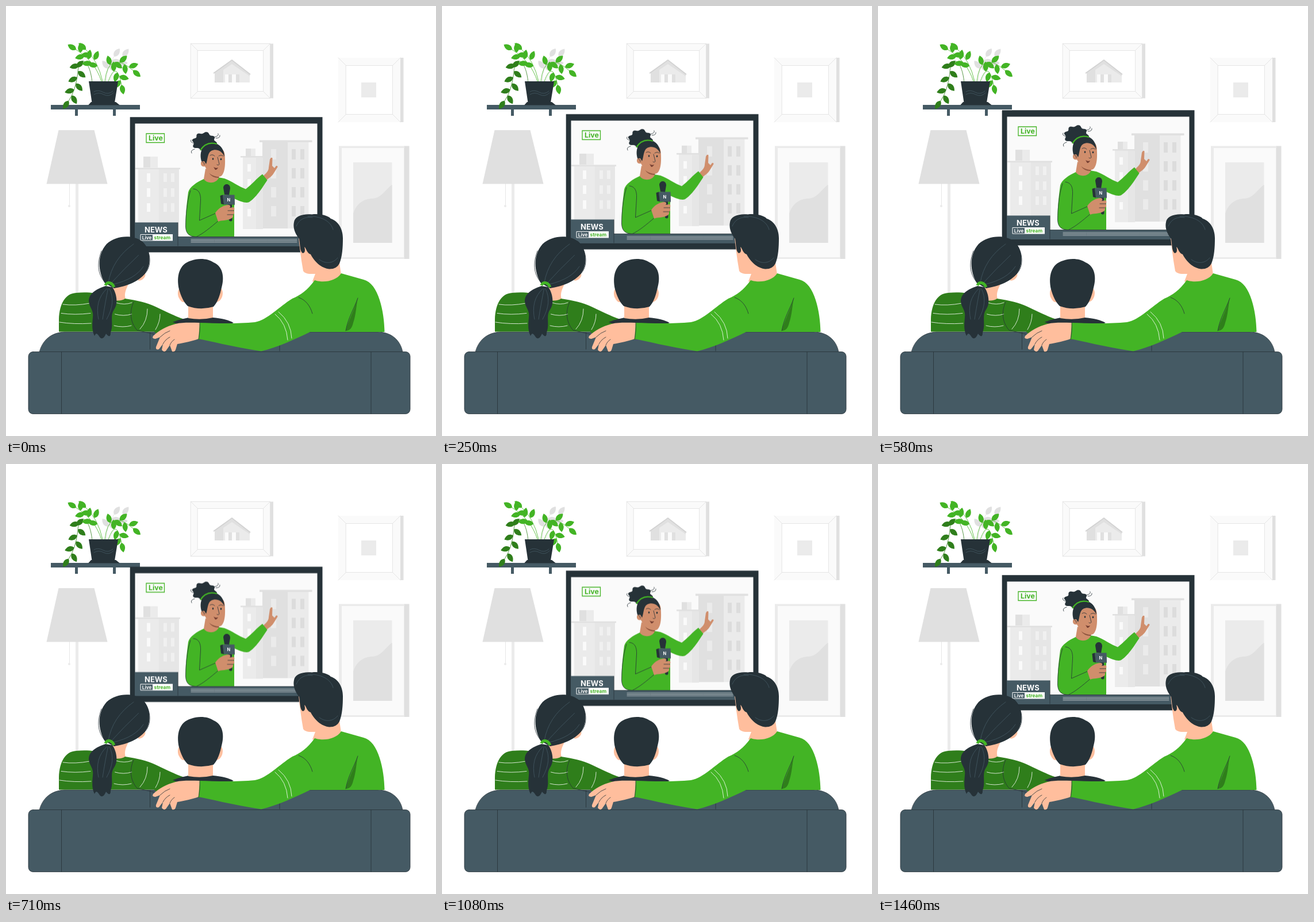
Write an HTML page that moves like this. It is 748 by 748 pixels and loops after 1.5 s.

```html
<!DOCTYPE html>
<html lang="en">
<head>
<meta charset="utf-8">
<title>Family watching the news</title>
<style>
html, body { margin: 0; width: 100%; height: 100%; overflow: hidden; background: #fff; }
svg { display: block; width: 100%; height: 100%; }
text { font-family: Inter, "Open Sans", sans-serif; font-weight: 700; }
.navy { fill: #263238; }
.slate { fill: #455a64; }
.green { fill: #43b425; }
.moss { fill: #2f7e1b; }
.skin { fill: #ffbe9d; }
.tan { fill: #d08e6c; }
.g1 { fill: #fafafa; }
.g2 { fill: #ebebeb; }
.g3 { fill: #e0e0e0; }
.line { fill: none; stroke: #263238; stroke-width: .8; stroke-linecap: round; stroke-linejoin: round; }
.pale { stroke: #e0e0e0; }
.soft { stroke: #455a64; }
.white { stroke: #fff; }
.band { fill: none; stroke: #43b425; }
</style>
</head>
<body>
<svg viewBox="0 0 748 748">
  <!-- pictures on the wall -->
  <g id="pictures"></g>
  <path class="g2" d="M363 116 393 95 424 118V133H363Z"/>
  <path class="g3" d="M363 116 378 105V133H363ZM393 95 424 118V122L393 101 378 111V105Z"/>
  <path class="g1" d="M381 119H405V133H381Z"/>
  <path class="g3" d="M387 119H393V133H387ZM400 119H406V133H400Z"/>
  <path fill="none" stroke="#d2d2d2" stroke-width="1.6" d="M361 117 393 94 425 119"/>
  <path class="g2" d="M618 133H644V159H618ZM579 243.5H694V440H579Z"/>
  <path class="g3" d="M693 243.5H701.5V440H693Z"/>
  <path class="g1" d="M584 247H692V437H584Z"/>
  <path class="g2" d="M604 272H671.5V412H604Z"/>
  <path class="g3" d="M604 361C610 343 622 336 636 335C653 335 660 319 671.5 311V412H604Z"/>

  <!-- lamp -->
  <path class="g2" d="M121 309H126V510H121Z"/>
  <path class="line pale" d="M110.500 309V347"/>
  <circle class="g2" cx="110" cy="348" r="2"/>
  <path class="g3" d="M91.500 216H153.500L176.500 309.500H70.500Z"/>

  <!-- shelf and plant -->
  <path class="slate" d="M78 172H233V180H78ZM120 180H125V191H120ZM186 180H191V191H186Z"/>
  <g id="plant"></g>
  <path class="navy" d="M144 131H195L189 168H149.500ZM148 167H191L198 172.500H143Z"/>
  <path class="line soft" d="M153 149Q160 145 169 150T186 148M153 154Q161 149 170 154T187 151"/>

  <!-- television -->
  <g id="tv">
    <path class="navy" d="M215.700 193.300H550.500V428.500H215.700Z"/>
    <path class="g1" d="M224.500 204.500H541.500V418H224.500Z"/>
    <g id="city">
      <path class="g2" d="M230 283H301V402H230ZM251 262H264V281H251ZM412 262H447V388H412ZM426 248H434V261H426ZM489 237H526.500V387H489Z"/>
      <path class="g3" d="M239 262H251V281H239ZM225 281.500H303V284H225ZM417 248H426V261H417ZM408 261H447V263.500H408ZM446 236H490V387H446ZM441 233.500H532.500V237H441Z"/>
      <path fill="#e6e6e6" d="M266 284H301V402H266ZM435 264H447V388H435Z"/>
    </g>
    <path class="band" stroke-width="1.3" d="M244 222H275.500V237.500H244Z"/>
    <text class="green" x="248" y="234.200" font-size="12.300">Live</text>

    <!-- reporter -->
    <path class="tan" d="M444 299C451 292 457 288 457 281L459 267Q461 262 463.500 264.500L463 278 467 282 470 278Q473 278 472.500 280L465 292C462 297 457 299 451 305Z"/>
    <path class="green" d="M346 300C332 306 319 315 317 324C314 346 312 369 312.500 384C313 397 320 401.500 331 401.500H397V335C407 340 416 343 422 341.500C434 335 446 316 454.500 303L446 292.500C437 299 427 311 417 318.500C405 314 393 305 380 300C371 298 357 297 346 300Z"/>
    <path class="line" d="M326 318C336 319 339 327 338.500 339L336.500 373 366 360M321 321C314 343 313 365 312.500 384C313 397 320 401 331 401.500C343 396 356 385 369 374M397 335V346"/>
    <path class="tan" d="M347 283 344 301C350 310 366 309 370 299V290Z"/>
    <path fill="#8f553f" d="M353 290Q360 297 371 296L370 299Q358 299 353 290Z"/>
    <path class="tan" d="M348 256C358 242 379 243 380.500 258C382 275 381 291 374 296C367 299 354 294 350 286L346 279C339 281 337 273 341 269Q345 266 348 273Z"/>
    <path class="navy" d="M340 270C336 255 341 244 352 240C365 235 379 243 380 262C375 250 364 248 357 252C350 256 351 268 348 275L345 270Z"/>
    <g id="bun"></g>
    <path class="band" stroke-width="2.300" d="M338 251C345 240 354 236 367 240"/>
    <path class="line" d="M328 239Q319 237 322 233M328 249Q320 251 323 256M363 228Q371 226 369 222M365 230Q373 230 372 225"/>
    <path class="line" d="M355 260Q359 257 363 261M370 261Q374 258 378 261M368 263 371 275Q370 278 367 276M341 271Q345 271 345 276"/>
    <ellipse class="navy" cx="360" cy="266" rx="1.300" ry="1.800"/>
    <ellipse class="navy" cx="374" cy="266.500" rx="1.300" ry="1.800"/>
    <path fill="#743e31" d="M361 280Q365 283 369 281Q367 285 364 285Z"/>
    <path class="navy" d="M386 344H393L393.500 373Q391 376 388 373ZM380 328 378 316C379 308 390 308 390 317L388 329Z"/>
    <path class="slate" d="M377 328.500H397.500L398 345.500H379Z"/>
    <path class="navy" d="M372.500 330 377 328.500 379 345.500 374 344Z"/>
    <text x="384.500" y="340" font-size="7.500" fill="#fff">N</text>
    <path class="tan" d="M364 360C370 351 379 346 388 346Q392 348 389 351L396 350Q399 353 396 356Q399 360 395 363Q396 368 391 370C383 374 376 372 369 375Z"/>
    <path class="line" stroke="#743e31" d="M396 356H386M395 363H385"/>

    <path class="slate" d="M224 401.500H541.500V418H224ZM224 376.500H299V418H224Z"/>
    <path class="line" d="M299 377V417M299 401.500H541"/>
    <g id="ticker" class="line white" opacity=".75"></g>
    <text x="241" y="394" font-size="13" fill="#fff">NEWS</text>
    <path fill="none" stroke="#fff" d="M234 397.500H255.500V408H234Z"/>
    <path fill="#fff" d="M255.500 397H290V408.500H255.500Z"/>
    <text x="236.800" y="405.500" font-size="8.200" fill="#fff">Live</text>
    <text class="green" x="257.500" y="405.500" font-size="8.400">stream</text>
  </g>

  <!-- sofa back -->
  <path class="slate" d="M58 603C63 582 78 568 102 567H646C669 567 686 580 690 603Z"/>
  <path class="line" d="M58 602C63 582 78 568 102 567H646C669 567 686 580 690 602M250.500 568V597M476 575V600"/>

  <!-- mother -->
  <path class="skin" d="M190 482 213 484C207 496 205 503 209 512C201 519 185 514 180 506ZM232 462C240 458 244 464 242 470Q239 477 230 478Z"/>
  <path class="moss" d="M92 566.500V545C93 518 103 500 122 499C140 497 157 499 170 503C184 515 201 514 207 509C228 512 245 516 260 523C285 535 312 549 338 551V580H290L265 574 258 566.500Z"/>
  <g id="stripes" class="line white"></g>
  <path class="line" d="M222 515C215 530 215 549 228 564L258 571"/>
  <path class="navy" d="M172 482C160 462 158 433 175 414C191 399 220 397 236 409C252 421 253 449 244 462C235 478 209 488 188 491Z"/>
  <path class="line" d="M236 409C253 425 255 454 240 467Q232 475 222 479M166 426C157 451 160 468 174 483"/>
  <path class="navy" d="M173 487C156 493 144 500 144 514C145 525 153 529 151 542C150 553 149 564 154 574C157 567 159 570 163 576C167 581 171 577 174 570C178 575 182 577 182 568C188 553 180 540 188 528C196 517 192 499 185 489Z"/>
  <g id="strands" class="line soft"></g>
  <path class="band" stroke-width="5" d="M173 486C175 479 184 480 188 489"/>

  <!-- son -->
  <path class="navy" d="M290 550C299 546 308 544 318 542H360C374 543 387 546 396 551L340 570Z"/>
  <path class="skin" d="M317 518H360V542Q339 547 317 543ZM307 491C299 488 297 501 301 508Q305 517 313 515ZM369 491C377 488 379 501 375 508Q371 516 363 515Z"/>
  <path class="navy" d="M316 522C308 514 304 503 301 493C296 470 301 449 322 443C334 438 352 439 361 446C378 453 380 473 375 490C372 503 369 514 361 523Q338 530 316 522Z"/>

  <!-- father -->
  <path class="skin" d="M509 402C511 424 513 434 514 443L517 461C521 467 531 466 538 466L533 479C551 487 572 484 583 467L579 440 535 405Z"/>
  <path class="green" d="M658.500 567C658 532 648 482 622 476L583 465C574 479 552 482 537 477C524 495 512 503 498 509C475 523 455 546 433 550C402 553 365 552 336 551L335 579C373 587 411 596 444 600.500C472 594 502 580 529 567Z"/>
  <path class="navy" d="M510 405C502 395 499 385 501 376C502 366 516 361 532 362.500C546 361 560 364 565 370C578 374 586 388 586 404C586 420 585 436 580 448Q575 458 562 457.500C548 456 536 444 530 432C523 430 523 422 519 419Q522 429 516 430C511 426 512 418 510 405Z"/>
  <path class="line soft" d="M505 383C510 370 522 366 533 368M525 366C548 365 565 374 569 389M545 441C557 450 570 447 577 438"/>
  <path class="moss" d="M612 508C605 531 596 546 591 565C598 565 602 560 604 551C609 536 609 523 612 508Z"/>
  <path class="line" d="M612 508C606 526 595 542 591 565M509 507C521 511 529 521 533 535"/>
  <g id="cuff" class="line white"></g>

  <!-- sofa front -->
  <rect class="slate" x="39" y="601.500" width="664" height="108" rx="8"/>
  <rect class="line" x="39" y="601.500" width="664" height="108" rx="8"/>
  <path class="line" d="M96.500 602V709M635 602V709"/>

  <!-- hand on the shoulder -->
  <path class="skin" d="M337 551C323 551 307 550 295 553C280 557 266 564 256 574Q253 579 260 579L268 576 261 593Q260 599 266 597L273 588 271 598Q274 603 278 600L285 590 289 601Q294 602 295 598L298 588C310 586 324 583 335 579Z"/>
  <path class="line" d="M268 576Q276 568 285 565M273 588Q277 580 285 576M285 590Q287 584 293 580M337 551Q338 566 335 579"/>
</svg>
<script>
const byId = id => document.getElementById(id);

function draw(parent, d, attrs = {}) {
  const path = document.createElementNS('http://www.w3.org/2000/svg', 'path');
  for (const [key, value] of Object.entries({ d, ...attrs })) path.setAttribute(key, value);
  return byId(parent).appendChild(path);
}

const rect = (x, y, w, h) => `M${x} ${y}h${w}v${h}h${-w}z`;

// A mount with mitred corners and a shaded right edge.
function picture(x, y, w, h, inset) {
  const r = x + w, b = y + h, i = inset;
  const inner = rect(x + i, y + i, w - 2 * i, h - 2 * i);
  draw('pictures', rect(r - 1, y, 6.5, h), { class: 'g3' });
  draw('pictures', rect(x, y, w, h), { class: 'g1' });
  draw('pictures', inner, { fill: '#fff' });
  draw('pictures', `${inner}M${x} ${y}l${i} ${i}M${r} ${y}l${-i} ${i}M${x} ${b}l${i} ${-i}M${r} ${b}l${-i} ${-i}`,
    { class: 'line pale' });
}
picture(321.5, 65.5, 138, 95, 12);
draw('pictures', rect(321.5, 65.5, 138, 95), { class: 'line pale' });
picture(578, 90, 108, 112, 13.5);

// Leaves alternate along a stem, with one more at its end.
function stem(color, d, count, start = .4) {
  const path = draw('plant', d, { class: 'line', style: `stroke:${color}` });
  const total = path.getTotalLength();
  for (let k = 0; k <= count; k++) {
    const at = total * (start + (1 - start) * k / count);
    const p = path.getPointAtLength(at), q = path.getPointAtLength(at - 1);
    const side = k === count ? 0 : k % 2 ? 55 : -55;
    const turn = Math.atan2(p.y - q.y, p.x - q.x) * 180 / Math.PI + side;
    draw('plant', 'M0 0C4 -6 11 -6 17 0C11 6 4 6 0 0Z',
      { fill: color, transform: `translate(${p.x} ${p.y}) rotate(${turn})` });
  }
}
stem('#e0e0e0', 'M174 131Q176 105 188 88', 2, .5);
stem('#e0e0e0', 'M180 131Q190 105 203 88', 2);
stem('#2f7e1b', 'M150 134C146 90 126 84 125 116Q121 148 109 165', 7, .36);
stem('#43b425', 'M166 131Q155 96 122 76', 4, .5);
stem('#43b425', 'M168 131Q160 95 139 76', 3, .45);
stem('#43b425', 'M172 131Q178 75 221 112', 5);
stem('#43b425', 'M178 131Q192 92 201 137', 4);

// Windows in even rows.
function windows(fill, x, y, w, h, cols, dx, rows, dy) {
  for (let c = 0; c < cols; c++)
    for (let r = 0; r < rows; r++) draw('city', rect(x + c * dx, y + r * dy, w, h), { fill });
}
windows('#fafafa', 245, 291, 6, 15, 1, 0, 3, 26);
windows('#f0f0f0', 274, 291, 6, 15, 2, 13, 3, 26);
windows('#fafafa', 420, 275, 6, 13, 1, 0, 4, 26);
windows('#ebebeb', 461, 249, 9, 18, 1, 0, 4, 33);
windows('#dcdcdc', 497, 249, 7, 18, 2, 15, 4, 33);

// Curly bun: an oval with a wavy rim.
let rim = '';
for (let a = 0; a < 2 * Math.PI; a += .05) {
  const r = 1 + .1 * Math.sin(8 * a) + .05 * Math.sin(3 * a);
  rim += `${rim ? 'L' : 'M'}${345 + 20 * r * Math.cos(a)} ${236 + 15 * r * Math.sin(a)}`;
}
draw('bun', rim + 'Z', { class: 'navy' });

// Evenly spaced curves between a first and a last one.
function sweep(parent, from, to, count) {
  for (let k = 0; k < count; k++) {
    const [x, y, cx, cy, ex, ey] = from.map((v, i) => v + (to[i] - v) * k / (count - 1));
    draw(parent, `M${x} ${y}Q${cx} ${cy} ${ex} ${ey}`);
  }
}
sweep('ticker', [322, 406, 400, 406, 506, 406], [322, 411, 400, 411, 506, 411], 3);
sweep('stripes', [99, 519, 120, 522, 146, 517], [93, 550, 118, 554, 148, 552], 3);
sweep('stripes', [191, 516, 206, 521, 219, 516], [188, 556, 203, 560, 218, 556], 3);
sweep('stripes', [246, 527, 246, 548, 233, 562], [268, 536, 268, 550, 260, 563], 2);
sweep('strands', [178, 481, 185, 440, 222, 414], [187, 484, 225, 475, 239, 453], 3);
sweep('strands', [175, 492, 154, 512, 161, 545], [180, 492, 192, 515, 175, 545], 3);
sweep('cuff', [468, 536, 488, 552, 490, 581], [474, 532, 496, 550, 497, 578], 2);

// The set floats up and back at constant speed, in 36 even steps.
const steps = 36, loop = 1500, lift = 14.96;
const poses = Array.from({ length: steps }, (_, k) => ({
  offset: Math.round(k * loop / steps / 10) * 10 / loop,
  transform: `translateY(${-lift * (1 - Math.abs(1 - 2 * k / (steps - 1)))}px)`,
  easing: 'step-end'
}));
poses.push({ offset: 1, transform: 'translateY(0px)' });
byId('tv').animate(poses, { duration: loop, iterations: Infinity });
</script>
</body>
</html>
```
